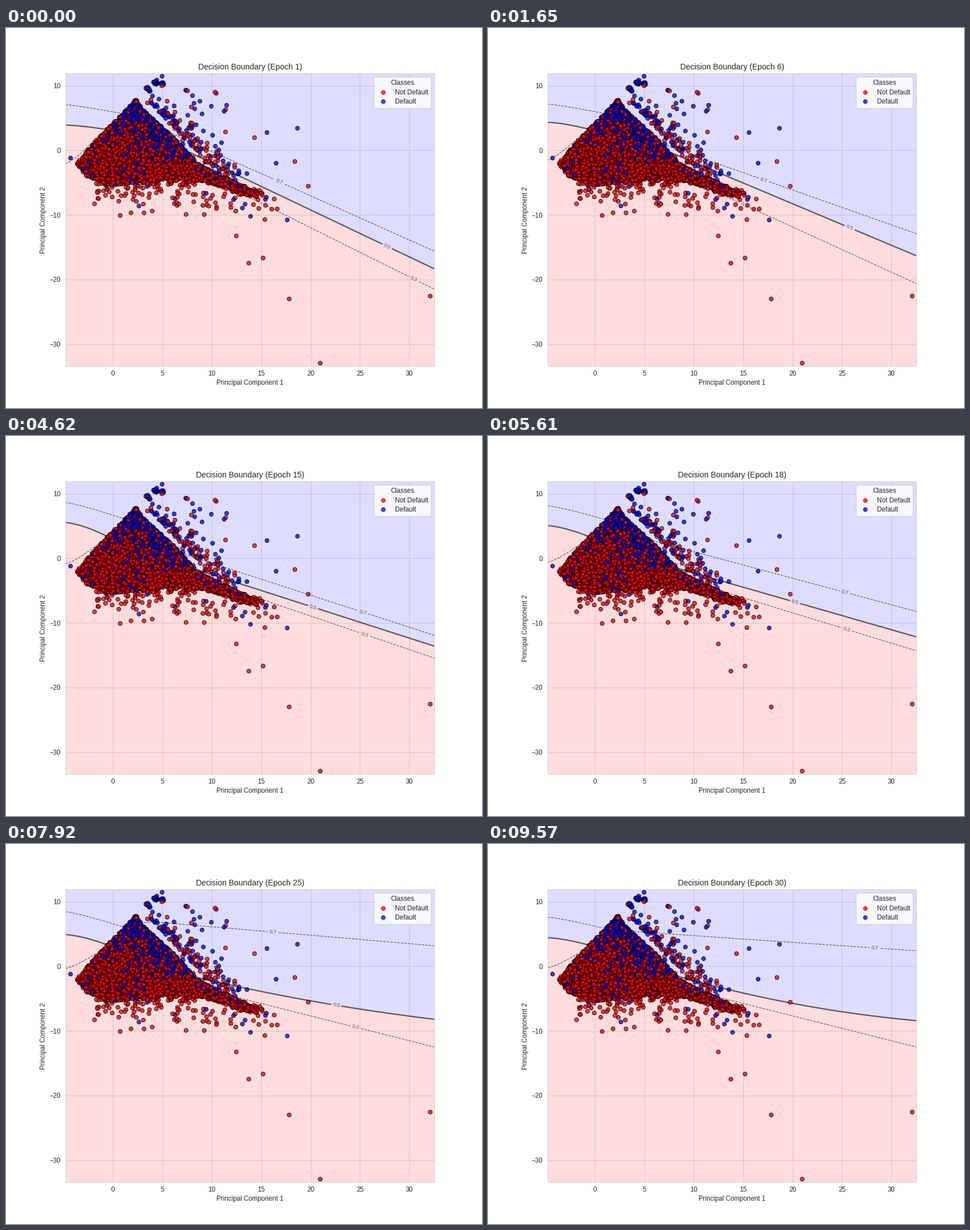
These frames come from a looping animation (837x669 px, 9900 ms). A matplotlib script:

```python
import numpy as np
import matplotlib.pyplot as plt
from matplotlib.animation import FuncAnimation
from matplotlib.lines import Line2D
from matplotlib.path import Path

plt.rcParams.update({
    "font.family": "Liberation Sans", "font.size": 10,
    "text.color": "0.15", "axes.labelcolor": "0.15",
    "xtick.color": "0.15", "ytick.color": "0.15",
    "axes.edgecolor": "0.8", "grid.color": "0.8",
    "axes.axisbelow": True, "lines.solid_capstyle": "round",
})

W, H, DPI = 837, 669, 669 / 8
EPOCHS = 30
LEFT, RIGHT, TOP, BOTTOM = 104.6, 753.3, 80.3, 595.4
X0, Y0, KX, KY = 188.2, 215.5, 17.37, 11.37
ALPHA = 0.75

# Each curve runs from the left border to a hub behind the cloud, then on
# through NEAR to the right border. Heights are in stage pixels per key epoch.
KEYS = [1, 6, 10, 15, 22, 27, 30]
NEAR = 430
CURVES = {
    0.7: dict(left=[135, 134, 114, 117, 130, 112, 128.5],
              near=[248, 248, 199, 246, 190, 126, 166],
              far=[393, 362, 287, 351, 253, 130, 188],
              label=[481, 485, 630, 628, 380, 469, 680],
              hub=lambda left: 103 + 0.35 * left, span=97, power=1.2, bend=0),
    0.5: dict(left=[171, 166, 161, 152.5, 165, 156, 165],
              near=[270, 265, 245, 266, 254, 257, 258],
              far=[424, 401, 330, 370, 332, 293, 311],
              label=[670, 636, 693, 540, 689, 581, 300],
              hub=lambda left: 180, span=80, power=1.5, bend=6),
    0.3: dict(left=[239, 232.5, 213.5, 225, 219, 219, 218],
              near=[299, 302, 267, 281, 276, 276, 276],
              far=[460, 450, 360, 391, 361, 355, 357.5],
              label=[717, 451, 563, 631, 615, 615, 300],
              hub=lambda left: 192, span=55, power=1.3, bend=0),
}

CORE = [(124, 238), (165, 191), (228, 127), (242, 145), (300, 198),
        (335, 238), (440, 290), (430, 296), (350, 270), (290, 265),
        (185, 277), (140, 260)]
RED_OUTLIERS = [(498, 477), (552.5, 590), (746, 472), (427, 414), (452, 405),
                (405, 366), (531.5, 278.5), (508, 235), (437, 193), (386, 183)]
BLUE_OUTLIERS = [(512.5, 176.5), (459, 184), (494.5, 338), (430, 331.5),
                 (113.5, 229), (274.5, 85), (475, 238), (388, 136)]

rng = np.random.default_rng(7)


def to_x(px):
    return (np.asarray(px) - X0) / KX


def to_y(py):
    return (Y0 - np.asarray(py)) / KY


def ease(t):
    t = np.clip(t, 0, 1)
    return t * t * (3 - 2 * t)


def inside(corners, n):
    lo, hi = np.min(corners, 0), np.max(corners, 0)
    pts = rng.uniform(lo, hi, (n * 6, 2))
    return pts[Path(corners).contains_points(pts)][:n]


def along(start, end, n, dx, dy):
    """Points strewn along a segment, pushed off it by dx and dy."""
    t = rng.random((n, 1))
    return np.array(start) * (1 - t) + np.array(end) * t + np.column_stack([dx, dy])


def clump(x, y, n, spread=2.2):
    return rng.normal((x, y), spread, (n, 2))


def blue_chance(p):
    rise = 172 + 0.43 * (p[:, 0] - 190) - p[:, 1]
    return 0.08 + 0.68 / (1 + np.exp(-rise / 9))


def make_points():
    core = inside(CORE, 4300)
    groups = [
        (core, blue_chance(core)),
        # fringes of the cloud
        (along((245, 130), (335, 218), 85, rng.exponential(9, 85),
               -rng.exponential(7, 85)), 0.55),
        (along((155, 268), (335, 266), 120, 0 * KEYS[0] * np.ones(120),
               rng.exponential(12, 120)), 0.07),
        (along((320, 256), (455, 297), 110, rng.normal(0, 3, 110),
               rng.normal(0, 5, 110)), 0.12),
        (along((330, 222), (415, 262), 55, rng.normal(0, 8, 55),
               rng.normal(0, 10, 55)), 0.5),
        # scattered strays
        (rng.uniform((280, 108), (395, 205), (22, 2)), 0.6),
        (along((335, 300), (480, 312), 30, rng.normal(0, 5, 30),
               rng.normal(0, 11, 30)), 0.2),
        (rng.uniform((215, 290), (350, 330), (12, 2)), 0.05),
        # tight clumps on the upper edge
        (clump(263, 96, 12), 0.75), (clump(275, 98, 9), 0.75),
        (clump(249, 108, 12), 0.75), (clump(228, 131, 14), 0.75),
        (clump(317, 110, 3, 0.8), 0.3), (clump(372, 223, 5), 0.3),
        (np.array(RED_OUTLIERS), 0), (np.array(BLUE_OUTLIERS), 1),
    ]
    pts = np.vstack([p for p, _ in groups])
    prob = np.concatenate([np.broadcast_to(q, len(p)) for p, q in groups])
    blue = rng.random(len(pts)) < prob
    order = rng.permutation(len(pts))
    return pts[order], blue[order]


def curve_heights(x, epoch, c):
    left, near, far = (np.interp(epoch, KEYS, c[k]) for k in ("left", "near", "far"))
    t = np.clip((x - LEFT) / c["span"], 0, 1)
    start = left + (c["hub"](left) - left) * t ** c["power"]
    u = (x - NEAR) / (RIGHT - NEAR)
    bend = c["bend"] * ease((epoch - 20) / 9)
    tail = near + (far - near) * u + 4 * bend * u * (1 - u)
    joint = LEFT + c["span"]
    return start + (tail - start) * ease((x - joint) / (268 - joint))


fig = plt.figure(figsize=((W + 0.001) / DPI, (H + 0.001) / DPI), dpi=DPI,
                 facecolor="white")
ax = fig.add_axes([0.125, 0.11, 0.775, 0.77])
ax.set_xlim(to_x(LEFT), to_x(RIGHT))
ax.set_ylim(to_y(BOTTOM), to_y(TOP))
ax.set_xticks(range(0, 31, 5))
ax.set_yticks(range(-30, 11, 10))
ax.tick_params(left=False, bottom=False)
ax.tick_params(axis="x", pad=2.8)
ax.grid(True)
ax.set_xlabel("Principal Component 1")
ax.set_ylabel("Principal Component 2")
title = ax.set_title("", fontsize=12)

xs = np.linspace(LEFT, RIGHT, 650)


def make_region(color):
    return ax.fill([0, 0, 0], [0, 0, 0], color=color, alpha=0.4, lw=0, zorder=1)[0]


above, under = make_region("#aaaaff"), make_region("#ffaaaa")
lines, tags = {}, {}
for level in CURVES:
    main = level == 0.5
    lines[level], = ax.plot([], [], "-" if main else "--", color="k",
                            alpha=0.6, lw=2 if main else 1, zorder=1.5)
    tags[level] = ax.text(0, 0, str(level), fontsize=8, color="k", alpha=0.6,
                          ha="center", va="center", zorder=1.6,
                          rotation_mode="anchor")

points, is_blue = make_points()
ax.scatter(to_x(points[:, 0]), to_y(points[:, 1]), s=36,
           c=np.where(is_blue, "blue", "red"), edgecolors="k", linewidths=1,
           alpha=ALPHA, zorder=2.2)

handles = [Line2D([], [], ls="", marker="o", ms=6, color=c, alpha=ALPHA, label=t)
           for c, t in (("red", "Not Default"), ("blue", "Default"))]
ax.legend(handles=handles, title="Classes", loc="upper right",
          labelspacing=0.42).set_zorder(5)


def fill_to(patch, ys, edge):
    px = np.concatenate([xs, [RIGHT, LEFT]])
    py = np.concatenate([ys, [edge, edge]])
    patch.set_xy(np.column_stack([to_x(px), to_y(py)]))


def draw(frame):
    epoch = frame + 1
    nearest = np.argmin(np.abs(np.array(KEYS) - epoch))
    title.set_text(f"Decision Boundary (Epoch {epoch})")
    for level, curve in CURVES.items():
        ys = curve_heights(xs, epoch, curve)
        if level == 0.5:
            fill_to(above, ys, TOP)
            fill_to(under, ys, BOTTOM)

        # Labels jump from place to place and cut a gap in their line.
        lx = curve["label"][nearest]
        ly, y1, y2 = np.interp([lx, lx - 8, lx + 8], xs, ys)
        angle = np.arctan2(y1 - y2, 16)
        tags[level].set_position((to_x(lx), to_y(ly)))
        tags[level].set_rotation(np.degrees(angle))
        gap = abs(xs - lx) < 9.5 * np.cos(angle)
        lines[level].set_data(to_x(xs), to_y(np.where(gap, np.nan, ys)))
    return [title, above, under, *lines.values(), *tags.values()]


anim = FuncAnimation(fig, draw, frames=EPOCHS, interval=330,
                     init_func=lambda: draw(0), repeat=True, repeat_delay=0)
plt.show()
```
